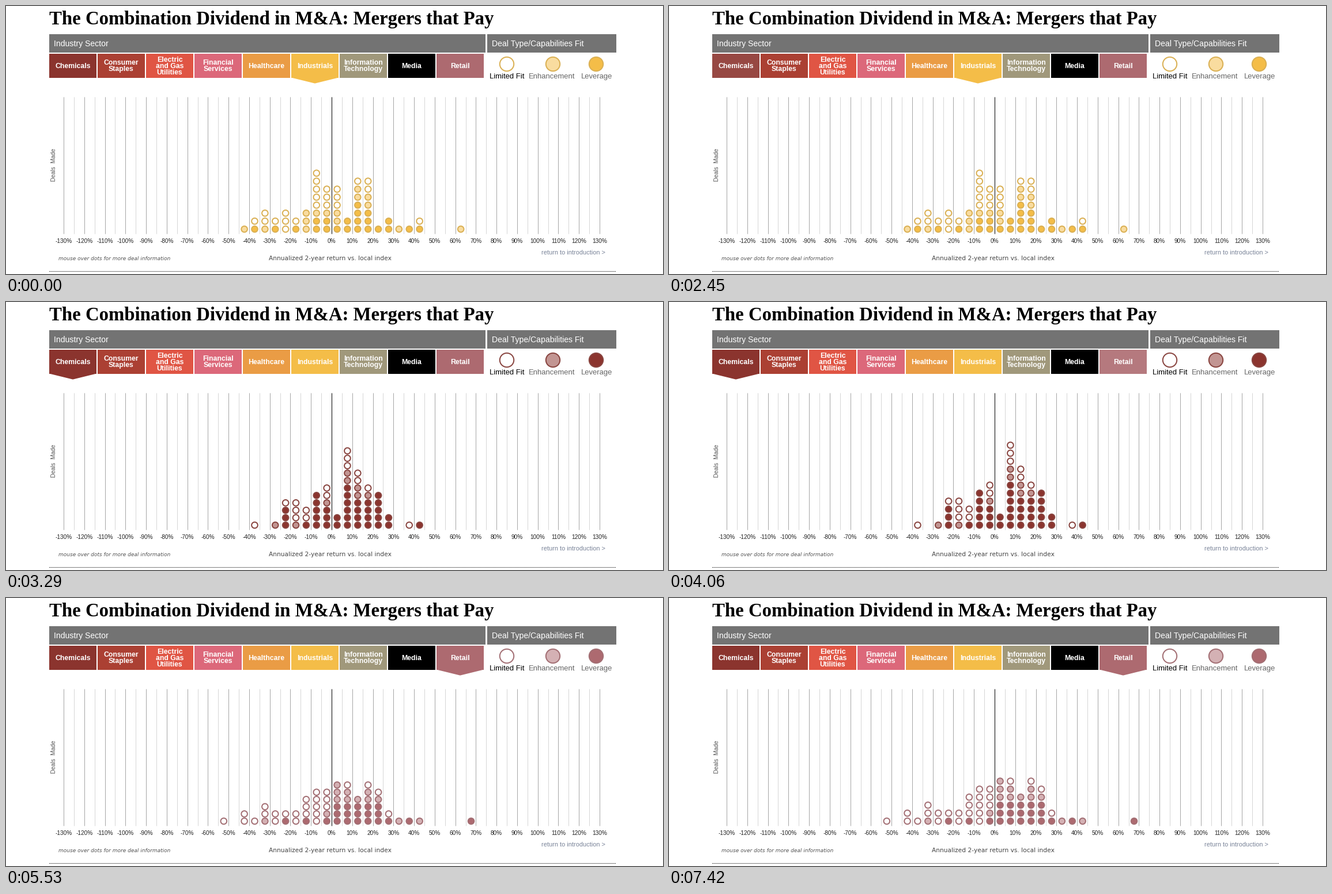
Recreate the animation shown at these times as a matplotlib script. Size 1140 px wide and 466 px high, loop 7490 ms.

```python
import math

import matplotlib.pyplot as plt
import numpy as np
from matplotlib.animation import FuncAnimation
from matplotlib.colors import to_rgb, to_rgba
from matplotlib.patches import Polygon, Rectangle

W, H, DPI = 1140, 466, 100
PT = 72 / DPI  # points per pixel
STEP, FRAMES = 70, 107
SANS, SERIF, WIDE = "Liberation Sans", "Liberation Serif", "DejaVu Sans"

SECTORS = [
    ("Chemicals", "#8b342e"),
    ("Consumer\nStaples", "#ab4033"),
    ("Electric\nand Gas\nUtilities", "#e05544"),
    ("Financial\nServices", "#dc687a"),
    ("Healthcare", "#ea9c45"),
    ("Industrials", "#f4bd48"),
    ("Information\nTechnology", "#a0987b"),
    ("Media", "#000000"),
    ("Retail", "#ad6a70"),
]
CHEMICALS, INDUSTRIALS, RETAIL = 0, 5, 8

# One stack per 5% column, bottom to top: L leverage, E enhancement, o limited fit.
# Each entry starts at the given percentage; "-" is an empty column.
DEALS = {
    INDUSTRIALS: (-42.5, "E Lo Eoo Lo ooo Lo EEE LLEooooo LLEooo LEEooo LL "
                         "LLLLEEo LLLEEoo L LL E L Lo - - - E"),
    CHEMICALS: (-37.5, "o - E LLLo Eooo Loo LLLLL LLLEoo LL LLLLLLEEooo "
                       "LLLLEEoo LLLLEo LLLLL LL - o L"),
    RETAIL: (-52.5, "o - oo o Eoo oo Lo oo Looo ooooo LEooo LLLEEE LLLEEo "
                    "LLLE LLLEEo LLLEo Lo E L E - - - - L"),
}

# Time of each click in ms, and how long a stack takes to unfold.
CLICKS = [(CHEMICALS, 2710), (RETAIL, 4970)]
UNFOLD = 700
HOVERS = {CHEMICALS: (1820, 2310, 2710), RETAIL: (3570, 4060, 4970)}


def mix(color, other, amount):
    return tuple(a + (b - a) * amount for a, b in zip(to_rgb(color), to_rgb(other)))


def ease(p):
    return (1 - math.cos(math.pi * min(max(p, 0), 1))) / 2


def percent_x(percent):
    return 565 + percent * 930 / 260


fig = plt.figure(figsize=(W / DPI, H / DPI), dpi=DPI, facecolor="white")
ax = fig.add_axes([0, 0, 1, 1])
ax.set(xlim=(0, W), ylim=(H, 0))
ax.axis("off")


def label(x, y, text, size, color="black", ha="left", font=SANS, **kw):
    kw.setdefault("va", "baseline")
    return ax.text(x, y, text, fontsize=size * PT, color=color, ha=ha,
                   family=font, **kw)


def box(x0, y0, x1, y1, color):
    return ax.add_patch(Rectangle((x0, y0), x1 - x0, y1 - y0, fc=color, lw=0))


def rule(x, y, color, **kw):
    ax.plot(x, y, color=color, lw=PT, solid_capstyle="butt", zorder=1, **kw)


def draw_header():
    label(75, 32, "The Combination Dividend in M&A: Mergers that Pay", 32.8,
          font=SERIF, weight="bold")
    box(75, 49, 832, 81, "#737373")
    box(835, 49, 1059, 81, "#737373")
    label(83, 70, "Industry Sector", 14, "white")
    label(843, 70, "Deal Type/Capabilities Fit", 14, "white")
    label(869, 126, "Limited Fit", 13, ha="center")
    label(947, 126, "Enhancement", 13, "#666666", "center")
    label(1025, 126, "Leverage", 13, "#666666", "center")


def draw_button(index):
    name, color = SECTORS[index]
    x = 75 + 84 * index
    lines = name.split("\n")
    for row, line in enumerate(lines):
        y = 107.8 + 11 * (row - (len(lines) - 1) / 2)
        label(x + 41, y, line, 12.2, "white", "center", weight="bold")
    return box(x, 83, x + 82, 125, color)


def draw_chart():
    for percent in range(-130, 131, 5):
        x = percent_x(percent)
        major = percent % 10 == 0
        color = "black" if percent == 0 else "#a6a6a6" if major else "#d6d6d6"
        rule([x, x], [158, 396], color)
        if major:
            label(x, 412, f"{percent}%", 10, "#222222", "center")
    label(83, 276, "Deals  Made", 10.3, "#555555", "center", va="center", rotation=90)
    label(91, 442, "mouse over dots for more deal information", 9.04, "#555555",
          font=WIDE, style="italic")
    label(562, 442, "Annualized 2-year return vs. local index", 10.6, "#444444",
          "center", WIDE)
    label(929, 432, "return to introduction >", 11, "#7a8499")
    rule([75, 1059], [461.5, 461.5], "black", dashes=(1, 1), dash_capstyle="butt",
         snap=False)


class SectorView:
    """Tab pointer, legend circles and dot stacks of one selected sector."""

    def __init__(self, index):
        color = SECTORS[index][1]
        x = 75 + 84 * index
        self.tab = ax.add_patch(Polygon([(x, 124.5), (x + 82, 124.5), (x + 41, 134.6)],
                                        fc=color, lw=0))
        fills = {"L": to_rgba(color), "E": to_rgba(color, 0.52), "o": (1, 1, 1, 0)}
        start, stacks = DEALS[index]
        dots = [(percent_x(start + 5 * column) + 0.6, level, kind)
                for column, stack in enumerate(stacks.split())
                for level, kind in enumerate(stack) if kind != "-"]
        self.x = np.array([d[0] for d in dots])
        self.level = np.array([d[1] for d in dots])
        ring = mix(color, "#808080", 0.22)
        self.dots = self.circles(self.x, 388 + 0 * self.x, 10.6,
                                 [fills[d[2]] for d in dots], ring)
        self.legend = self.circles([869, 949, 1024], [101] * 3, 24.4,
                                   [fills[k] for k in "oEL"], ring)

    @staticmethod
    def circles(x, y, diameter, fills, ring):
        return ax.scatter(x, y, s=(diameter * PT) ** 2, facecolors=fills,
                          edgecolors=[ring], linewidths=2 * PT, zorder=4)

    def show(self, visible, spread):
        for artist in (self.tab, self.dots, self.legend):
            artist.set_visible(visible)
        self.dots.set_offsets(np.column_stack([self.x, 388 - 13.9 * spread * self.level]))


draw_header()
buttons = [draw_button(i) for i in range(len(SECTORS))]
draw_chart()
views = {index: SectorView(index) for index in DEALS}


def update(frame):
    t = frame * STEP
    selected, spread = INDUSTRIALS, 1
    for index, click in CLICKS:
        if t >= click:
            selected, spread = index, ease((t - click) / UNFOLD)
    for index, view in views.items():
        view.show(index == selected, spread)
    for index, (enter, full, leave) in HOVERS.items():
        glow = min(max((t - enter) / (full - enter), 0), 1) if t < leave else 0
        buttons[index].set_facecolor(mix(SECTORS[index][1], "white", 0.1 * glow))
    return []


animation = FuncAnimation(fig, update, frames=FRAMES, interval=STEP,
                          repeat=True, repeat_delay=0)
plt.show()
```
